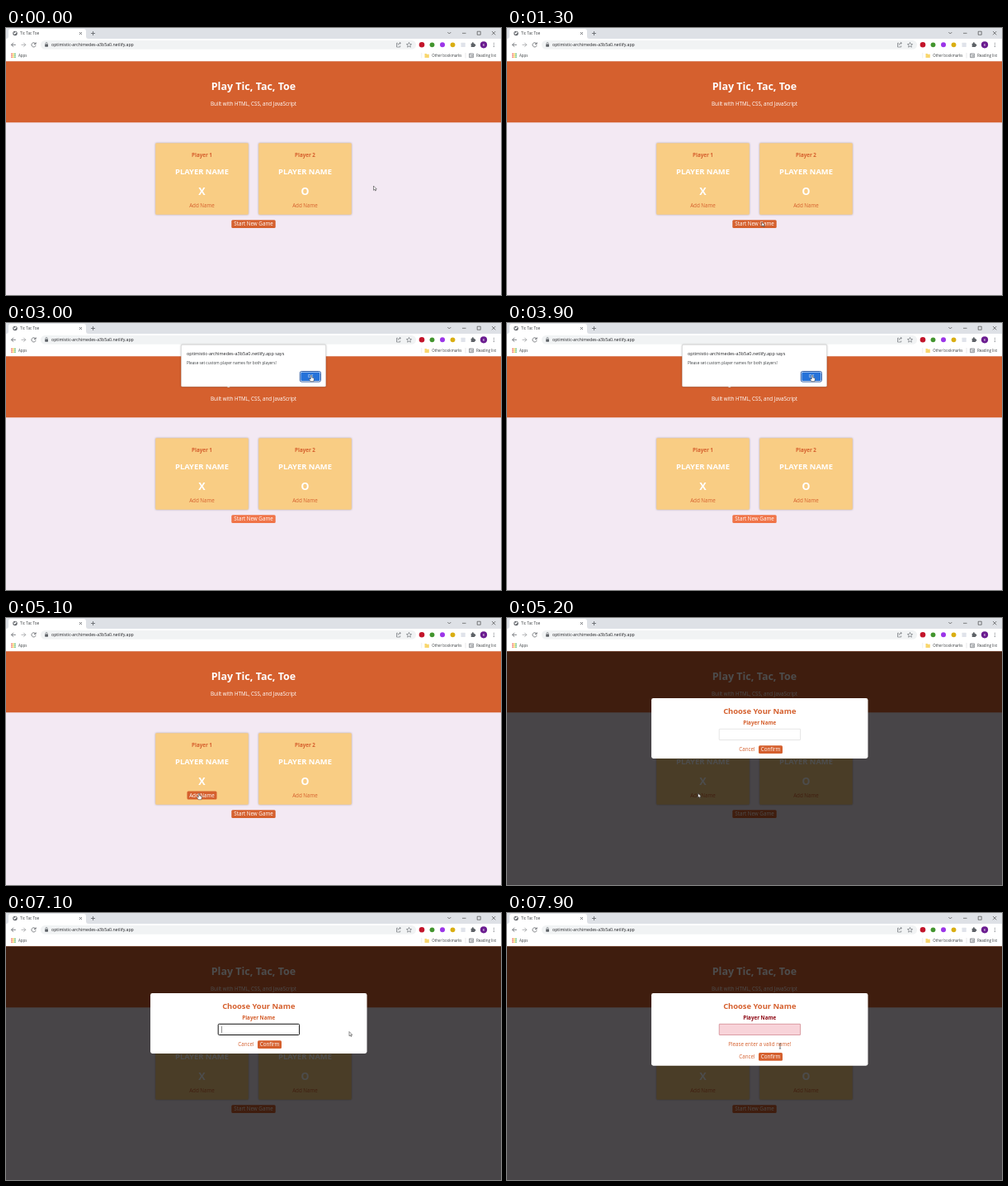
An HTML page that plays this animation: 600 px wide and 323 px high, repeating every 8 s.

```html
<!DOCTYPE html>
<html lang="en">
<head>
<meta charset="utf-8">
<title>Tic Tac Toe</title>
<style>
html, body { margin: 0; width: 100%; height: 100%; overflow: hidden; background: #f3e9f3; }
svg { display: block; width: 600px; height: 323px; font-family: "Open Sans", sans-serif; }
.b { font-weight: 700; }
.line { fill: none; stroke: #5f6368; stroke-width: .8; }
.shadow { filter: drop-shadow(0 .5px 1px rgba(0, 0, 0, .3)); }
</style>
</head>
<body>
<svg id="stage" viewBox="0 0 600 323"></svg>
<script>
const ORANGE = '#d5602e', HOVER = '#f07448', CARD = '#f9cd84', INK = '#3c4043';
const URL_TEXT = 'optimistic-archimedes-a3b5a0.netlify.app';
const stage = document.getElementById('stage');

const rect = (x, y, w, h, fill, r = 0, more = '') =>
  `<rect x="${x}" y="${y}" width="${w}" height="${h}" rx="${r}" fill="${fill}" ${more}/>`;
const dot = (x, y, r, fill) => `<circle cx="${x}" cy="${y}" r="${r}" fill="${fill}"/>`;
const line = (d, more = '') => `<path class="line" d="${d}" ${more}/>`;
// Text is placed by the middle of its capitals.
const text = (s, x, mid, size, fill, anchor = 'middle', bold = false, id = '') =>
  `<text ${id && `id="${id}"`} x="${x}" y="${mid + .357 * size}" font-size="${size}" fill="${fill}"
    text-anchor="${anchor}" ${bold ? 'class="b"' : ''}>${s}</text>`;
const bold = (s, x, mid, size, fill, id) => text(s, x, mid, size, fill, 'middle', true, id);
const label = (s, x, mid, size, fill = INK) => text(s, x, mid, size, fill, 'start');

function browser() {
  const apps = ['#ea4335', '#fbbc04', '#34a853', '#4285f4'];
  let grid = '';
  for (let i = 0; i < 9; i++)
    grid += rect(6.3 + i % 3 * 2, 30.6 + (i / 3 | 0) * 2, 1.3, 1.3, apps[(i + (i / 3 | 0)) % 4]);
  return rect(0, 0, 600, 40, '#fff') + rect(0, 0, 600, 13, '#dee1e6') +
    '<path d="M0 13Q3 13 3 10V4Q3 1 6 1H94Q97 1 97 4V10Q97 13 100 13Z" fill="#fff"/>' +
    dot(11, 6.5, 2.7, '#5f6368') +
    '<path d="M9 5.5l2 .3 .5-1.5 1.3 1-1 1.7-1.3.4-.3 1.2z" fill="#fff"/>' +
    label('Tic Tac Toe', 17, 6.5, 4.7) +
    line('M89 5l3 3m0-3l-3 3M103 6.5h5m-2.5-2.5v5') +
    line('M535.3 5l2 2 2-2M553 6.3h4.5M571.2 4.2h4v4h-4zM589 4l4.3 4.3m0-4.3l-4.3 4.3', 'style="stroke:#333;stroke-width:.6"') +
    line('M11.8 20.3H6.5m2.5-2.5l-2.5 2.5 2.5 2.5M35.8 19a2.6 2.6 0 1 0 .3 2M36.2 17.3v2.2h-2.2') +
    line('M18.5 20.3h5.3m-2.5-2.5l2.5 2.5-2.5 2.5', 'opacity=".6"') +
    rect(42, 15, 455, 10.8, '#f1f3f4', 5.4) +
    rect(47.2, 19.5, 3.8, 3.2, '#5f6368', .4) + line('M48 19.5v-.9a1.1 1.1 0 0 1 2.2 0v.9', 'style="stroke-width:.6"') +
    label(URL_TEXT, 55, 20.4, 5.2, '#202124') +
    line('M475 18.3h-1.5v4.7h4.2v-1.5M474.8 21q.3-2.7 3.5-2.7m-1.4-1.3l1.5 1.3-1.5 1.4', 'style="stroke-width:.6"') +
    line('M488.5 17.4l.9 2 2.2.2-1.7 1.5.5 2.1-1.9-1.1-1.9 1.1.5-2.1-1.7-1.5 2.2-.2z', 'style="stroke-width:.6"') +
    dot(504, 20.3, 3.3, '#c3152b') + dot(516.5, 20.3, 2.9, '#43952f') +
    dot(529, 20.3, 3, '#9b35e8') + dot(541.5, 20.3, 2.9, '#d9ae12') +
    rect(551.5, 17.8, 5.2, 5.2, '#e0e3ea', .5) +
    rect(563.7, 18.7, 4.4, 4.4, '#5f6368', .5) + dot(565.8, 18.3, 1.1, '#5f6368') + dot(568.3, 20.8, 1.1, '#5f6368') +
    dot(579, 20.3, 4.1, '#6a1b8f') + text('K', 579, 20.3, 4.3, '#fff') +
    [18.2, 20.3, 22.4].map(y => dot(591.3, y, .55, '#5f6368')).join('') +
    grid + label('Apps', 15, 33.2, 4.5) +
    rect(503.7, 30, .4, 6.5, '#d5d7da') +
    '<path d="M507.5 31h2l.7.8h2.6v4.2h-5.3z" fill="#f8d66d"/>' +
    label('Other bookmarks', 516.3, 33.2, 4.4) + rect(556.8, 30, .4, 6.5, '#c5c7ca') +
    line('M561.5 31h5v4.7h-5zM564.2 32.3h1.6m-1.6 1.2h1.6m-1.6 1.2h1.6M563 31v4.7', 'style="stroke-width:.6"') +
    label('Reading list', 570, 33.2, 4.5);
}

const card = (n, mark, x) =>
  rect(x - 56.3, 139.3, 112.6, 86.5, CARD, 1.2, 'class="shadow"') +
  bold('Player ' + n, x, 153.3, 6.25, ORANGE) +
  bold('PLAYER NAME', x, 173.6, 9.375, '#fff') +
  bold(mark, x, 198, 12.5, '#fff') +
  rect(x - 18, 209.5, 36, 10, ORANGE, 1.5, `id="addBox${n}" visibility="hidden"`) +
  text('Add Name', x, 214.5, 6.25, ORANGE, 'middle', false, 'add' + n);

const page = () =>
  rect(0, 40, 600, 283, '#f3e9f3') + rect(0, 40.3, 600, 74, ORANGE) +
  bold('Play Tic, Tac, Toe', 300, 70.2, 12.5, '#fff') +
  text('Built with HTML, CSS, and JavaScript', 300, 91.3, 6.25, '#fff') +
  card(1, 'X', 237.5) + card(2, 'O', 362.5) +
  rect(273.3, 232.2, 53.4, 9.8, ORANGE, 1.5, 'id="start"') +
  text('Start New Game', 300, 237.2, 6.25, '#fff');

const modal = () => '<g id="modal">' +
  rect(0, 40.3, 600, 283, '#000', 0, 'opacity=".7"') +
  rect(175, 97, 262.5, 73, '#fff', 2.4, 'id="panel"') +
  bold('Choose Your Name', 306.3, 113, 9.375, ORANGE) +
  bold('Player Name', 306.3, 126.8, 6.25, ORANGE, 'nameLabel') +
  rect(257.2, 134.3, 98.4, 13.2, '#fff', .5, 'id="input" stroke="#ccc" stroke-width=".5"') +
  rect(261.2, 137, .5, 8, '#222', 0, 'id="caret"') +
  `<g id="error">${text('Please enter a valid name!', 306.3, 158.6, 6.25, ORANGE)}</g>` +
  '<g id="actions">' + text('Cancel', 291, 159, 6.25, ORANGE) +
  rect(305, 154.2, 29, 9.8, ORANGE, 1.5) + text('Confirm', 319.5, 159, 6.25, '#fff') + '</g></g>';

const alertBox = () => '<g id="alert">' +
  rect(212.3, 26.3, 175.4, 50.7, '#fff', 1.6, 'class="shadow" stroke="#bbb" stroke-width=".4"') +
  label(URL_TEXT + ' says', 219, 37.5, 5.5, '#202124') +
  label('Please set custom player names for both players!', 219, 48.8, 4.75) +
  rect(356.3, 58.5, 25.2, 12.6, '#fff', 2, 'stroke="#1d4f9c" stroke-width=".9"') +
  rect(357.3, 59.5, 23.2, 10.6, '#2572d9', 1.4) + text('OK', 369, 64.8, 4.7, '#fff') + '</g>';

const cursors = () => '<g id="cursor" stroke-linejoin="round">' +
  '<path id="arrow" d="M0 0V5.3L1.3 4.2 2.2 6 3 5.6 2.2 3.9H3.8Z" fill="#fff" stroke="#222" stroke-width=".5"/>' +
  '<path id="hand" d="M-.7.6Q0-.4.7.6V3L3 3.5Q3.6 3.8 3.4 5L2.8 7.7H-.9L-2.6 4.9Q-2.3 4-.7 4.9Z" fill="#fff" stroke="#333" stroke-width=".5"/>' +
  '<path id="beam" d="M-1.2-3H1.2M0-3V3M-1.2 3H1.2" fill="none" stroke="#333" stroke-width=".6"/></g>';

stage.innerHTML = browser() + page() + modal() + alertBox() + cursors();

const el = id => document.getElementById(id);
const show = (id, on) => el(id).setAttribute('visibility', on ? 'visible' : 'hidden');
const set = (id, attrs) => { for (const k in attrs) el(id).setAttribute(k, attrs[k]); };

// Pointer path: time, x, y
const path = [
  [0, 445.5, 191], [400, 445.5, 191], [1400, 305, 236], [2200, 305, 236], [2400, 319.5, 192],
  [3000, 370, 63], [4000, 370, 63], [4800, 236, 212], [5100, 234, 212], [5200, 231.5, 212],
  [5500, 231.5, 212], [6100, 300, 141], [6500, 300, 141], [7000, 416, 143.5],
  [7100, 416, 143.5], [7600, 331, 161], [8000, 331, 161]
];

function pointer(t) {
  const i = path.findIndex(p => p[0] > t);
  const [t0, x0, y0] = path[i - 1], [t1, x1, y1] = path[i];
  const u = (t - t0) / (t1 - t0), e = u * u * (3 - 2 * u);
  return [x0 + (x1 - x0) * e, y0 + (y1 - y0) * e];
}

function draw(now) {
  const t = Math.floor(now % 8000 / 100) * 100;
  const within = (a, b) => t >= a && t < b;
  const open = t >= 5200, failed = t >= 7700, focus = within(6100, 7600);

  set('start', { fill: within(1400, 4200) ? HOVER : ORANGE });
  const adding = within(4800, 5200);
  show('addBox1', adding);
  set('add1', { fill: adding ? '#fff' : ORANGE });
  show('alert', within(2500, 4100));

  set('modal', { display: open ? 'inline' : 'none' });
  set('panel', { height: failed ? 87.7 : 73 });
  set('nameLabel', { fill: failed ? '#8f0b16' : ORANGE });
  set('input', {
    fill: failed ? '#f8d3d9' : '#fff',
    stroke: failed ? '#b9505c' : focus ? '#111' : '#ccc',
    'stroke-width': focus ? 1 : .5,
    rx: focus ? 1.2 : .5
  });
  show('caret', focus && (t - 6100) % 1000 < 500);
  show('error', failed);
  set('actions', { transform: `translate(0 ${failed ? 14.7 : 0})` });

  const hand = within(1400, 4200) || adding || within(7500, 7700);
  const beam = within(6000, 6600) || failed;
  show('hand', hand);
  show('beam', beam);
  show('arrow', !hand && !beam);
  set('cursor', { transform: `translate(${pointer(t)})` });
}

const begin = performance.now();
function tick() {
  draw(performance.now() - begin);
  requestAnimationFrame(tick);
}
tick();
</script>
</body>
</html>
```
